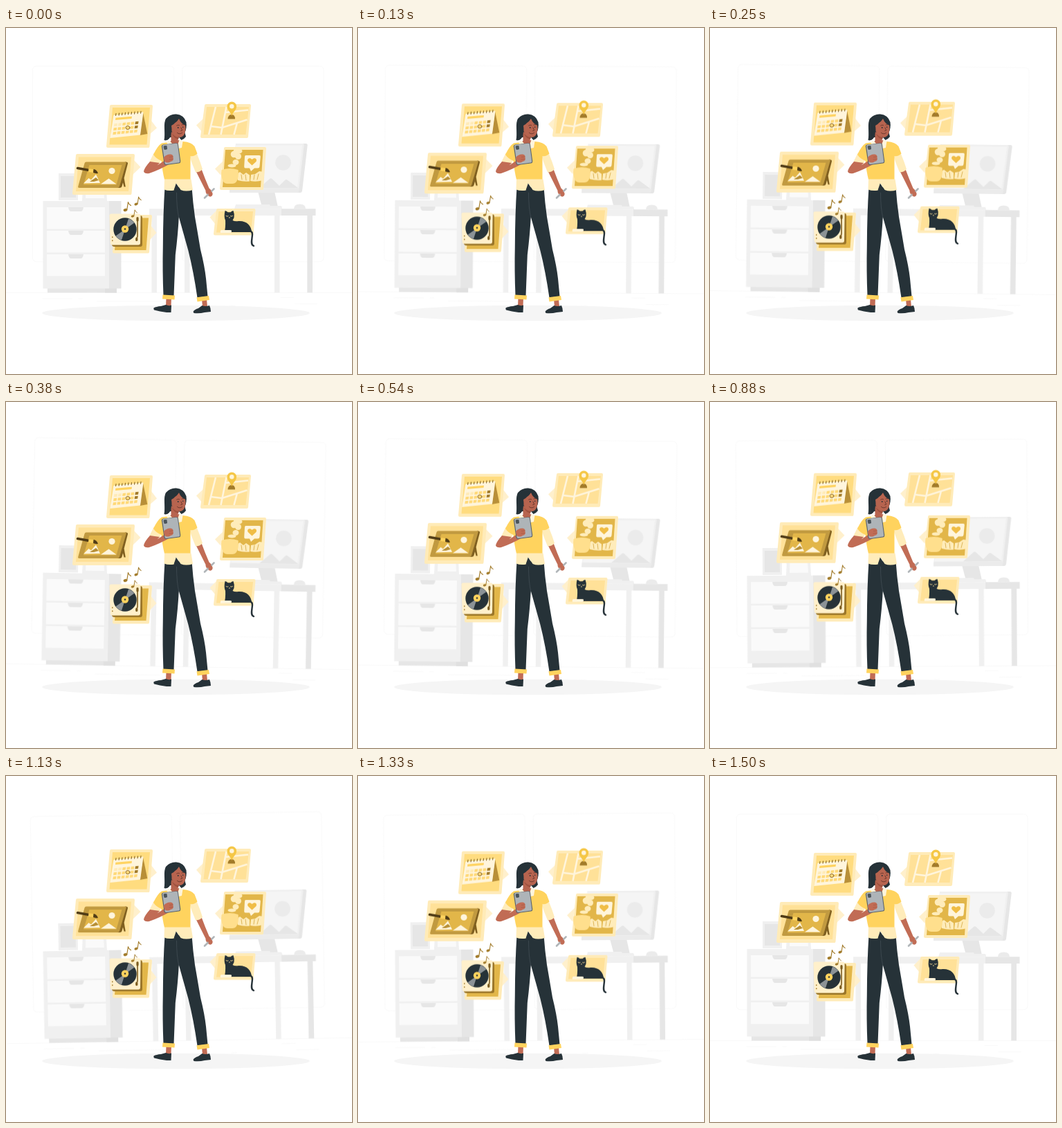
These frames come from a looping animation (500 by 500 pixels, 1.54 s). An HTML page:

```html
<!DOCTYPE html>
<html lang="en">
<head>
<meta charset="utf-8">
<title>Woman with phone and floating cards</title>
<style>
html, body { margin: 0; width: 100%; height: 100%; overflow: hidden; background: #fff; }
svg { display: block; width: 100%; height: 100%; }
#room { transform-origin: 250px 250px; }
.line { fill: none; stroke: #ebebeb; stroke-width: .3; }
.e6 { fill: #e6e6e6; } .eb { fill: #ebebeb; } .f0 { fill: #f0f0f0; } .f5 { fill: #f5f5f5; } .fa { fill: #fafafa; }
.outer { fill: #ffebb8; stroke: #ffebb8; stroke-width: 4; stroke-linejoin: round; }
.tail { fill: #fff0cc; }
.inner { fill: #ffdc7f; }
.soft { fill: #ffe198; }
.gold { fill: #e2b649; }
.cream { fill: #fff5dc; }
.pale { fill: #ffecba; }
.yellow { fill: #ffd35e; }
.brown { fill: #a27b2a; }
.dark { fill: #263238; }
.skin { fill: #c16c55; }
.face { fill: #b7644f; }
.pen { fill: none; stroke-linecap: round; stroke-linejoin: round; }
</style>
</head>
<body>
<svg viewBox="0 0 500 500">
  <g id="room">
    <g class="line">
      <rect x="38.3" y="55" width="204.4" height="282.7" rx="5.6"/>
      <rect x="254.6" y="55" width="204.4" height="282.7" rx="5.6"/>
      <path d="M0 382.5H500M416.8 398.6h33M322.5 401.3h8.7M396.6 389.3h19.2M52.5 391h43.2M104.6 391h6.3M131.5 395.2h93.7"/>
    </g>

    <!-- cabinet and picture frames -->
    <path class="f0" d="M76 210H104V249H76Z"/>
    <path class="e6" d="M79 214H101V245H79Z"/>
    <path class="e6" d="M108 211H112L117 250H113Z"/>
    <path class="f0" d="M112 211H144L146 250H110Z"/>
    <path class="fa" d="M116 215H140L142 246H115Z"/>
    <path class="e6" d="M60 376H160V382.6H60Z"/>
    <path fill="#e0e0e0" d="M143 376H160V382.6H143Z"/>
    <path class="f0" d="M53.5 250H149V376.5H53.5Z"/>
    <path class="e6" d="M149 250H166.5V376.5H149Z"/>
    <g id="drawers"></g>

    <!-- desk -->
    <path class="f0" d="M210.5 270H218V382.5H210.5ZM388 270H395.5V382.5H388ZM258 270H265.5V382.5H258Z"/>
    <path class="e6" d="M435.3 270H443V382.5H435.3Z"/>
    <path class="f0" d="M207 261.3H399V271H207Z"/>
    <path class="e6" d="M398 261.3H447.5V271H398Z"/>

    <!-- monitor, keyboard, mouse -->
    <path class="e6" d="M364 236H388L393 259H370Z"/>
    <path class="f0" d="M369 257H397Q399 257 399 261.3H369Z"/>
    <path class="e6" d="M334 167H433.5Q436 167 435.7 169.5L428 235.5Q427.5 238 425 238H326Z"/>
    <path class="f0" d="M332 167H428.5Q431 167 430.7 169.5L423 235.5Q422.5 238 420 238H324Q322.5 238 323 235Z"/>
    <path class="f5" d="M332 169.5H428L421 231H325Z"/>
    <circle class="eb" cx="400.5" cy="194.5" r="11.3"/>
    <path class="e6" d="M366 231L381 218Q383 216.5 385 218.5L395 228 403 220Q405 218 407 220L422 231Z"/>
    <path class="eb" d="M323.5 231.5H424L423 235.5Q422.5 238 420 238H323Z"/>
    <path class="f0" d="M330 261.3L332 255H381L384 261.3Z"/>
    <path class="eb" d="M416 261.3Q416 254.5 424.5 254.5T433 261.3Z"/>
  </g>

  <ellipse class="f5" cx="245.5" cy="412" rx="193.5" ry="11.3"/>

  <g id="cards">
    <!-- calendar -->
    <g>
      <path class="tail" d="M210 134L218 144.5 207 154Z"/>
      <path class="outer" d="M152 113H210L205.500 171H147Z"/>
      <path class="inner" d="M154 115H208L203.5 168.500H149.500Z"/>
      <path fill="#b88f38" d="M198 122L204.300 153 193.500 155Z"/>
      <path class="cream" d="M155.500 126L198.500 121.500 194 154.500 150.300 159Z"/>
      <path class="yellow" d="M158.500 129.800L182 127.700 181.500 131 158 133Z"/>
      <g id="days"></g>
      <ellipse class="pen" cx="176" cy="144" rx="3" ry="2.500" stroke="#936d21" stroke-width="1"/>
    </g>

    <!-- map -->
    <g>
      <path class="tail" d="M285 131L275 140.500 283 150Z"/>
      <path class="outer" d="M289 112H352L348 157H283Z"/>
      <path class="soft" d="M290 114H351L346.500 154H285.500Z"/>
      <path class="pen" stroke="#fff5dc" stroke-width="2.600" style="stroke-linecap:butt" d="M303 114L296 142 293 154M318.500 114L310.500 154M296 142L312 144 348.500 132.500M317 122L350 118.500M334 137L329.500 154"/>
      <path class="brown" d="M320.500 131.500Q321 125 326 125T331 131.500Z"/>
      <path fill="#f5c746" d="M326.300 127C324.500 121 319.500 119 319.500 113.300A6.800 6.800 0 0 1 333.100 113.300C333.100 119 328 121 326.300 127Z"/>
      <circle class="cream" cx="326.300" cy="113.300" r="3.200"/>
    </g>

    <!-- painting -->
    <g>
      <path class="tail" d="M184 190L194.500 201 182 213Z"/>
      <path class="outer" d="M103 184H184L179.500 239H98Z"/>
      <path class="soft" d="M105 186.500H181L177 236H101Z"/>
      <path fill="#806020" d="M169 207L172.800 229.500H170.500L166 212ZM172 193.500Q176.500 193 176 196L167.500 229Q167 231 164 231H158Z"/>
      <path fill="#c19a40" d="M116 193.500H172Q174.300 193.500 173.700 195.500L164 229Q163.500 231 161 231H106Q103.500 231 104.300 228.500L113.500 195.500Q114 193.500 116 193.500Z"/>
      <path class="gold" d="M120.500 198H167.500L159.500 226.500H112Z"/>
      <path class="cream" d="M112 224.500L119.500 217 123 219.500 130 211.500 136 224ZM137 225.500L148.500 217.500 159.500 225.500Z"/>
      <path fill="#b78f35" d="M121 222L130 216 134 220 127 222Z"/>
      <circle class="cream" cx="153" cy="206.500" r="4.600"/>
      <path class="pen" stroke="#4f3b16" stroke-width="3.600" d="M103.500 202.500L120 205.500"/>
      <path class="yellow" d="M119.500 203.300L127 204.300 126.500 209 119 208Z"/>
      <path fill="#4f3b16" d="M126.500 204Q131 204.500 133 210Q129 210.500 126 209Z"/>
    </g>

    <!-- turntable -->
    <g>
      <path class="tail" d="M209 285L217.500 296 207 307Z"/>
      <path class="outer" d="M159 272H209L205 323.500H156Z"/>
      <path class="gold" d="M161 274.500H206L202.500 321H157Z"/>
      <path fill="#9b7629" d="M155 271H194Q197 271 197 274L197 313Q197 316 194 316H157Q153 316 153 313Z"/>
      <path fill="#fff0cb" d="M152 268.500H192Q194.700 268.500 194.600 271L194 310.500Q194 313.500 191 313.500H153.500Q151 313.500 150.800 311L149.500 271Q149.500 268.500 152 268.500Z"/>
      <circle class="dark" cx="172" cy="291" r="16.700"/>
      <path fill="#8b9296" d="M172 291L177 275.500A16.300 16.300 0 0 1 185.500 281.500ZM172 291L167 306.500A16.300 16.300 0 0 1 158.500 300.500Z"/>
      <circle class="yellow" cx="172" cy="290.500" r="5.200"/>
      <circle class="dark" cx="172" cy="290.500" r="1.200"/>
      <path class="pen" stroke="#7b5c1f" stroke-width="1.600" d="M190 275V301L188.500 306"/>
      <path class="pen" stroke="#7b5c1f" stroke-width="3.200" d="M190 274.500V278M188.800 304V306.500"/>
      <path class="pen" stroke="#a27b2a" stroke-width="1.600" d="M153.800 302V302.500M153.800 307V307.500"/>
      <g id="notes"></g>
    </g>

    <!-- coffee -->
    <g>
      <path class="tail" d="M313 193L302 203.500 310.500 213Z"/>
      <path class="outer" d="M317 174H374L370 232H311Z"/>
      <path class="gold" d="M317 176H371.500L368 230H313Z"/>
      <path class="cream" d="M346.500 184H366Q368 184 367.800 186L366.500 200Q366.300 202.500 364 202.500H359L354 207 352 202.500H346Q344 202.500 344.200 200L345 186Q345 184 346.500 184Z"/>
      <g class="pale">
        <ellipse cx="335" cy="178" rx="6.500" ry="3.800"/>
        <circle cx="329.500" cy="182.500" r="4.800"/><circle cx="335.500" cy="185.500" r="4.500"/>
        <ellipse cx="332" cy="194" rx="4.500" ry="4"/><ellipse cx="326.500" cy="199" rx="6" ry="2.600"/>
        <path d="M335 220Q333 210 338 208L343 212 347 209 352 212.500 352 221.500Q343 222.500 335 220ZM353 221L354 212 360 211 366 207Q374 207 373 214L371 220Q362 223 353 221Z"/>
      </g>
      <path fill="#f0bd45" d="M355.500 198.500L349.700 193C347.500 189 352.500 186.500 355.500 190C359 186.500 363.500 189 361.500 193Z"/>
      <path class="pen" stroke="#d3a63f" stroke-width=".8" d="M340 212L341 219M346 212L347 220M359 212L358 219M365 211L363 219"/>
      <path fill="#ffdf8d" d="M311.500 205Q323.500 201 335.500 205Q337 216 333 222Q331 225 327 225H320Q316 225 314 222Q310 215 311.500 205Z"/>
    </g>

    <!-- cat -->
    <g>
      <path class="tail" d="M304 264L294.500 273.500 302 283Z"/>
      <path class="outer" d="M306 263H358.500L355.500 297.500H302Z"/>
      <path class="soft" d="M307.500 265H357L354 295.500H304Z"/>
      <path class="dark" d="M316.500 264Q319 264.500 320.500 266.300H324.500Q326 264.500 328.500 264Q330.500 269 329.500 274L327.500 278Q331 280 336 279Q345 278.500 350 283.500Q354.500 288 355 295H315.500Q317.500 289 317 278Q314.500 273 316.500 264Z"/>
      <path class="pen" stroke="#263238" stroke-width="2.400" d="M348 293.500Q355.500 291.500 356 298C356 304 352.500 313.500 358 314.800"/>
      <path class="cream" d="M311 292H324Q326.500 292 326 294T324 296H310Q309 293 311 292Z"/>
      <path class="pen" stroke="#ffe198" stroke-width=".9" d="M318 271.500Q319.500 273 321 271.800M324.500 271.800Q326 273 327.500 271.500M322.300 274H323.500"/>
    </g>
  </g>

  <!-- woman -->
  <g>
    <path class="dark" d="M231 131Q237 124 246 124.500Q257 125.500 260.500 136Q261.500 145 258.500 151L260 157Q257 161 253.500 162L250 158H237Q234 163 228.500 162Q230 155 229 146Q228.500 135 231 131Z"/>
    <path class="face" d="M238.500 150L249 155 248.500 164 254 167 246 177 234 167 238.500 163Z"/>
    <path class="face" d="M239 141Q242 131 250 130Q259 133 259.500 145Q259 157.500 251 158Q242 157 239.500 149Z"/>
    <path fill="#9f523f" d="M239.500 152Q243.500 157.500 250 158L249 161Q242 159 239.500 152Z"/>
    <path class="dark" d="M230 140Q233 126 249 127Q247 137 239 141Q240 151 236.500 158.500Q234 163 229 162ZM248 127Q258 127.500 260.500 141Q253 139 250 131Q247 136 243 138Z"/>
    <circle class="dark" cx="248.700" cy="144" r=".9"/><circle class="dark" cx="255.700" cy="143.300" r=".8"/>
    <path class="pen" stroke="#5c3027" stroke-width=".8" d="M246.700 141Q248.500 139.700 250.500 140.500M254 140Q255.500 139 257 139.700M253 144L254.700 148 252.700 148.500M247.500 151.500Q251 154.500 254.500 151.500"/>

    <!-- trousers and shoes -->
    <path class="skin" d="M231.500 390H239L238.500 402H231ZM283 392H290L291 403H284Z"/>
    <path class="dark" d="M213.500 404.500Q217 402.500 224 402L231 400Q235 402 239 400.500L238.500 411H232Q222 409.500 214 407.500Q213 406 213.500 404.500ZM270.500 410Q272 407 278 405L283.500 401Q288 403 294 401Q296 405 296 410L287 411Q280 412.800 271.500 412Z"/>
    <path class="dark" d="M229.500 230H268.500Q270 252 273 273Q276 290 281 320Q287 344 289 362L291.500 388 276.500 389.500Q271 352 263.500 322L249.800 273Q248.500 298 244.800 328L242.500 387H227.500Q226 350 226.800 316Q227 268 229.500 230Z"/>
    <path class="pen" stroke="#465158" stroke-width=".7" d="M246.500 238Q246.500 260 249.800 274"/>
    <path class="yellow" d="M226.500 385.500L244 386.500 243.500 392.500 226 391.500ZM275.500 389.300L293 387 294 393 276.500 395.500Z"/>

    <!-- right arm and stylus -->
    <path class="skin" d="M274.500 207L282.500 204Q288 219 293.500 231.500Q299 236 298.500 241Q297 245 293 243Q288 239 288.500 235Z"/>
    <path class="pen" stroke="#b0b5b8" stroke-width="2.600" d="M287 245.500L300.500 232.500"/>
    <path class="skin" d="M290.500 233L296 235 298 240Q296 243 292.500 241Z"/>
    <path class="pale" d="M264 181L276 182Q281 194 284 204Q280 208.500 274 208.500Q268 195 264 181Z"/>

    <!-- shirt -->
    <path class="pale" d="M214 180L227 183 222 196Q216 199 207.500 193Z"/>
    <path class="yellow" d="M232 165.500Q246 171 256 164Q268 165 272.500 171L276.500 181.500Q272 186 266.500 185V219H229Q226 207 224.500 192Q217 189 213 183Q219 170 225 166.500Z"/>
    <path class="face" d="M238 164L250.500 162 253 165 246.500 174 237 167Z"/>
    <path class="cream" d="M234 162.500L238 164.500 246 175 239 174.500 232.500 166.500ZM250.500 161.500L255.500 163.500 254 173 246 175Z"/>
    <path class="pale" d="M229 218.500H267.500L270 234Q260 237 252.500 234L246 224.500 243 234.500Q235 236 228.500 233.500Z"/>
    <path class="dark" d="M245.800 224.500L252.500 234.500H242.500Z"/>

    <!-- left arm, phone -->
    <path class="skin" d="M208 193L222 195 218.500 198.500 233 189 239 195Q222 205 207 210Q200 211 199 207Q200 202 208 193Z"/>
    <path fill="#59636a" d="M227 168.500L246 166.300Q248.500 166 249 168.500L252.300 192.500Q252.500 195 250 195.500L231.500 198Q229 198.200 228.500 196L224.800 171Q224.600 169 227 168.500Z"/>
    <path fill="#aeb4b8" d="M228 168.700L246 166.700Q247.700 166.500 248 168.500L251.200 192.500Q251.300 194.300 249.700 194.600L232 196.900Q230 197.200 229.600 195.400L226 171Q225.800 169 228 168.700Z"/>
    <path fill="#4a545a" d="M228.300 170.300L231.500 170Q232.500 170 232.600 171L233 174.500Q233 175.500 232 175.600L229.500 175.900Q228.500 175.900 228.400 175L227.500 171.500Z"/>
    <path class="skin" d="M228 187Q232 182 238 182.500Q242 183 241.500 187Q243 192 238 193Q234 196 229 193Z"/>
    <path class="pen" stroke="#9f523f" stroke-width=".6" d="M236.500 186.500L241 186M236 190L241 189.500"/>
  </g>
</svg>
<script>
const add = (id, markup) => document.getElementById(id).innerHTML += markup;

for (const y of [259, 293, 327]) {
  add("drawers", `<path class="fa" d="M59 ${y}H143V${y + 31.5}H59Z"/>
    <path class="e6" d="M90 ${y}H112Q111 ${y + 6} 108 ${y + 6}H94Q91 ${y + 6} 90 ${y}Z"/>`);
}

for (let i = 0; i < 9; i++) {
  const x = 159 + i * 4.5, y = 123.5 - i * 0.4;
  add("days", `<path class="pen" stroke="#806020" stroke-width="1.1" d="M${x} ${y}l-.4 3"/>`);
}
for (let row = 0; row < 3; row++) {
  for (let col = 0; col < 6; col++) {
    const x = 156.5 + col * 6.1 - row * 0.8, y = 138.2 + row * 6 - col * 0.6;
    const fill = row < 2 && col === 5 ? "#a27b2a" : row || col > 1 ? "#ffd978" : "#ffebb8";
    add("days", `<path fill="${fill}" d="M${x} ${y}l4.6-.4-.6 4-4.6.4z"/>`);
  }
}

for (const [x, y, s] of [[172.5, 263, 1], [188, 254.5, 0.9], [183, 272, 0.8]]) {
  add("notes", `<g transform="translate(${x} ${y}) scale(${s})">
    <ellipse class="brown" rx="2.9" ry="2" transform="rotate(-15)"/>
    <path class="pen" stroke="#a27b2a" stroke-width="1.2" d="M2.3 -.5L4 -11.5Q4.5 -8.5 8 -6.5"/></g>`);
}

// One 1500 ms cycle, then a short rest before the loop restarts.
const LOOP = 1540, CYCLE = 1500;
function loop(id, steps) {
  const frames = steps.map(([part, transform]) => ({ offset: part * CYCLE / LOOP, transform }));
  frames.push({ offset: 1, transform: steps[0][1] });
  const motion = document.getElementById(id).animate(frames, { duration: LOOP, iterations: Infinity });
  motion.startTime = 0;
}
loop("cards", [[0, "translateY(0px)"], [.5, "translateY(-10px)"], [1, "translateY(0px)"]]);
loop("room", [[0, "rotate(0deg)"], [.25, "rotate(1deg)"], [.75, "rotate(-1deg)"], [1, "rotate(0deg)"]]);
</script>
</body>
</html>
```
